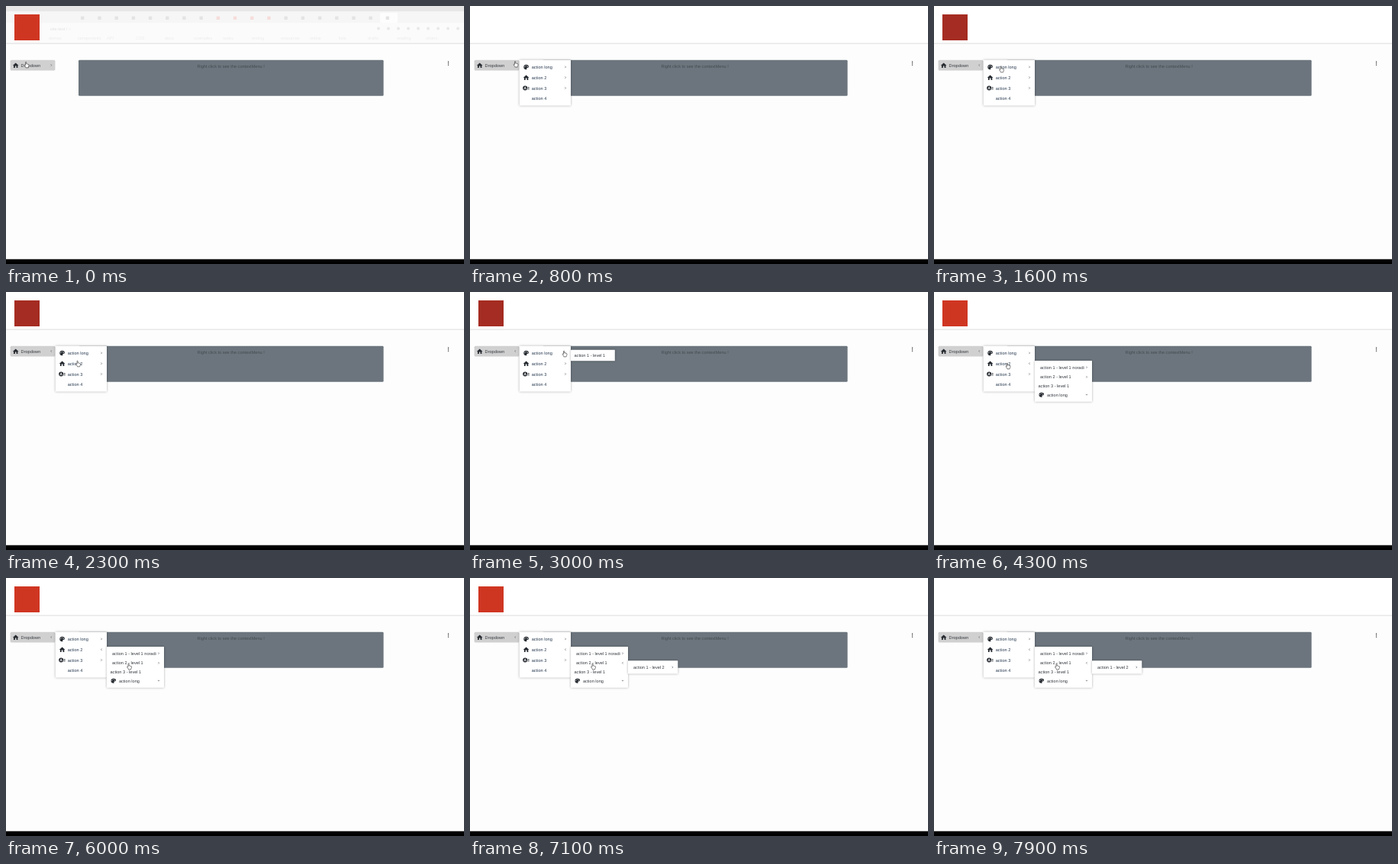
An HTML page that plays this animation: 600 by 338 pixels, repeating every 8000 ms.

```html
<!DOCTYPE html>
<html lang="en">
<head>
<meta charset="utf-8">
<title>Nested dropdown menu</title>
<style>
html, body { margin: 0; width: 100%; height: 100%; overflow: hidden; background: #fdfdfd; }
svg { display: block; width: 100vw; height: 100vh; }
text { font: 5.6px "Liberation Sans", Arial, sans-serif; text-rendering: geometricPrecision; }
.box { fill: #fff; filter: drop-shadow(0 .9px 1.8px rgba(0, 0, 0, .32)); }
.chev { fill: none; stroke: #5c6066; stroke-width: .7; }
</style>
</head>
<body>
<svg viewBox="0 0 600 338">
  <defs>
    <path id="home" d="M-3.8 .3 0-3.3 3.8 .3H2.7V3.2H.9V.8H-.9V3.2H-2.7V.3Z" fill="#252a30"/>
    <g id="palette">
      <path d="M0-3.2C-4.4-3.2-4.4 3.2 0 3.2 1 3.2 1 2.4.7 1.8.4 1.2.9.9 1.6.9 3 .9 3.4 0 3.3-.8 3-2.4 1.6-3.2 0-3.2Z" fill="#252a30"/>
      <g fill="#fff"><circle cx="-2" cy="-.2" r=".5"/><circle cx="-.9" cy="-1.8" r=".5"/><circle cx=".9" cy="-1.8" r=".5"/><circle cx="2" cy="-.4" r=".5"/></g>
    </g>
    <g id="auto">
      <circle cx="-1.4" r="3" fill="#252a30"/>
      <path d="M-2.8 1.5-1.4-1.8 0 1.5M-2.3.5H-.5" fill="none" stroke="#fff" stroke-width=".7"/>
      <path d="M2-1H4M2.3.2H4M2 1.4H4" stroke="#252a30" stroke-width=".7"/>
    </g>
  </defs>
  <rect width="600" height="338" fill="#fdfdfd"/>
  <rect width="600" height="49" fill="#fff"/>
  <g id="bars">
    <rect width="600" height="49" fill="#fcfbfb"/>
    <rect y="7" width="600" height="15" fill="#f7f6f6"/>
    <rect width="600" height="7" fill="#e7e7e7"/>
    <rect x="490" y="9" width="23" height="13" rx="2" fill="#fdfdfd"/>
    <text x="58" y="31.5" fill="#e2e2e2">site.test / ~</text>
  </g>
  <rect y="48.6" width="600" height="1" fill="#dcdcdc"/>
  <rect id="logo" x="11" y="11" width="33" height="34"/>
  <rect x="95" y="70.8" width="399.6" height="47" rx="1.4" fill="#6c757d"/>
  <text x="294.6" y="81" text-anchor="middle" fill="#454b51">Right click to see the contextMenu !</text>
  <path d="M579.5 72.9v0m0 2.2v0m0 2.2v0" stroke="#444" stroke-width="1.5" stroke-linecap="round"/>
  <rect x="5.6" y="70.8" width="58.8" height="13.8" rx="1.5" fill="#d0d0d0"/>
  <use href="#home" x="12.7" y="77.8"/>
  <text x="19.6" y="79.5" fill="#33383d">Dropdown</text>
  <g id="menus"></g>
  <g id="hand">
    <path d="M-1.7-3.6C-1.7-4.6-.4-4.6-.4-3.6V-1.2C.2-1.6.8-1.4.9-.9 1.5-1.3 2.1-1 2.2-.5 2.9-.8 3.4-.4 3.4.2 3.4 2 3 2.9 2.4 3.5V4.4H-1.3V3.7C-2.3 2.5-2.7 1.6-3.2.7-3.5-.2-2.5-.5-1.7.5Z" fill="#fff" stroke="#333" stroke-width=".7" stroke-linejoin="round"/>
  </g>
  <rect y="331.7" width="600" height="7"/>
</svg>
<script>
const LOOP = 8000, STEP = 100;
const $ = id => document.getElementById(id);
const bars = $("bars"), hand = $("hand"), logo = $("logo");

function el(parent, tag, attrs, label) {
  const node = document.createElementNS("http://www.w3.org/2000/svg", tag);
  for (const key in attrs) node.setAttribute(key, attrs[key]);
  if (label) node.textContent = label;
  parent.append(node);
  return node;
}

// Faint browser tabs, tools and bookmarks
for (let x = 98; x < 500; x += 22.2) {
  const fill = x > 260 && x < 350 ? "#f5dedb" : "#e4e4e4";
  el(bars, "rect", { x, y: 13.5, width: 4.5, height: 4.5, rx: 1, fill });
}
for (let x = 488; x < 600; x += 13)
  el(bars, "circle", { cx: x, cy: 29.5, r: 2, fill: "#e8e8e8" });
"demos components API CSS docs examples notes testing resources online lists drafts reading others"
  .split(" ").forEach((name, i) =>
    el(bars, "text", { x: 56 + i * 38, y: 44, fill: "#ececec" }, name));

// A chevron points right, or left while its menu is open
const chevrons = [], menus = [];
function chevron(parent, x, y, opens) {
  const node = el(parent, "path", { class: "chev", d: "M-.6-1.2.6 0-.6 1.2" });
  chevrons.push({ node, x, y, opens });
}

// Items: text, icon ("blank" keeps its space), and the menu it opens or "idle" / "down"
function menu(x, y, width, span, color, items) {
  const g = el($("menus"), "g", {});
  const box = el(g, "rect", { class: "box", x, y, width, rx: .6 });
  let top = y + 2.3;
  for (const { text, icon, opens } of items) {
    const row = icon ? 13.8 : opens ? 12.6 : 10;
    const mid = top + row / 2;
    const indent = icon ? 15.9 : opens ? 7 : 4.5;
    el(g, "text", { x: x + indent, y: mid + 2, fill: color }, text);
    if (icon) el(g, "use", { href: "#" + icon, x: x + 8.8, y: mid + .1 });
    if (opens) chevron(g, x + width - 7, mid, opens);
    top += row;
  }
  box.setAttribute("height", top + 2.3 - y);
  menus.push({ g, span });
}

const open = { root: [300, LOOP], first: [2500, 3700], second: [3800, LOOP], third: [6900, LOOP] };
const isOpen = (name, t) => name in open && t >= open[name][0] && t < open[name][1];
const navy = "#26384f", slate = "#34393f";

chevron($("menus"), 59.3, 77.5, "root");
menu(64.8, 70.7, 67.2, open.root, navy, [
  { text: "action long", icon: "palette", opens: "first" },
  { text: "action 2", icon: "home", opens: "second" },
  { text: "action 3", icon: "auto", opens: "idle" },
  { text: "action 4", icon: "blank" }
]);
menu(132, 75.7, 57.8, open.first, slate, [{ text: "action 1 - level 1" }]);
menu(132, 90.1, 75, open.second, slate, [
  { text: "action 1 - level 1 noradi", opens: "idle" },
  { text: "action 2 - level 1", opens: "third" },
  { text: "action 3 - level 1" },
  { text: "action long", icon: "palette", opens: "down" }
]);
menu(207, 108.3, 65.3, open.third, slate, [{ text: "action 1 - level 2", opens: "idle" }]);

// Pointer stops: arrival time, x, y
const GLIDE = 700;
const stops = [
  [0, 27, 77], [700, 60, 76.2], [1600, 88.5, 83], [2000, 90, 116], [2500, 97, 82], [3000, 124, 81],
  [3300, 165, 83], [3600, 97, 97], [5800, 168, 117], [6000, 161.5, 116], [6400, 166, 119], [6600, 161.5, 116]
];
const ramp = (t, a, b) => Math.max(0, Math.min(1, (t - a) / (b - a)));
const mix = (a, b, k) => a + (b - a) * k;

function pointer(t) {
  let [last, x, y] = stops[0];
  for (const [time, nx, ny] of stops.slice(1)) {
    const u = ramp(t, Math.max(last, time - GLIDE), time);
    const k = u * u * (3 - 2 * u);
    x = mix(x, nx, k);
    y = mix(y, ny, k);
    last = time;
  }
  return `translate(${x} ${y}) scale(.88)`;
}

function draw(now) {
  const t = Math.floor(now % LOOP / STEP) * STEP;
  hand.setAttribute("transform", pointer(t));
  bars.setAttribute("opacity", 1 - ramp(t, 0, 500));

  const bright = 1 - ramp(t, 500, 900) + ramp(t, 3300, 4000);
  logo.setAttribute("opacity", 1 - ramp(t, 200, 500) + ramp(t, 900, 1500) - ramp(t, 7600, 7800));
  logo.setAttribute("fill", `rgb(${mix(165, 207, bright)} ${mix(44, 54, bright)} 34)`);

  for (const { g, span: [from, to] } of menus)
    g.setAttribute("opacity", t < from || t >= to ? 0 : ramp(t, from - 80, from + 180));
  for (const { node, x, y, opens } of chevrons) {
    const turn = opens === "down" ? 90 : isOpen(opens, t) ? 180 : 0;
    node.setAttribute("transform", `translate(${x} ${y}) rotate(${turn})`);
  }
}

const start = performance.now();
function tick() {
  draw(performance.now() - start);
  requestAnimationFrame(tick);
}
tick();
</script>
</body>
</html>
```
